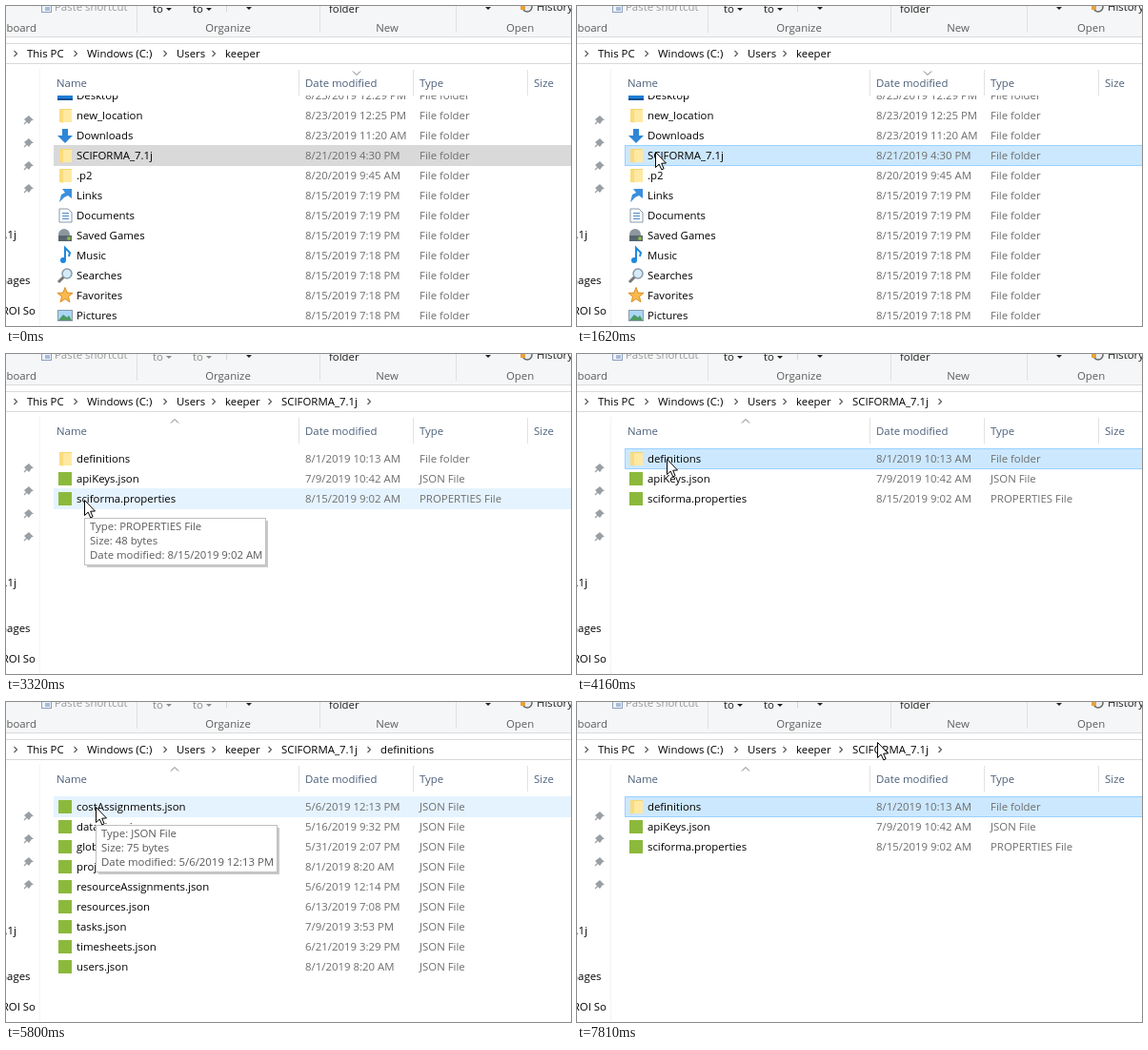
An HTML page with a canvas for the animation above (8000 ms loop, 593 by 336 pixels).

```html
<!DOCTYPE html>
<html lang="en">
<head>
<meta charset="utf-8">
<title>File browser</title>
<style>
  html, body { margin: 0; width: 593px; height: 336px; overflow: hidden; background: #fff; }
  canvas { display: block; }
</style>
</head>
<body>
<canvas id="stage" width="593" height="336"></canvas>
<script>
const ctx = document.getElementById('stage').getContext('2d');
const LOOP = 8000, ROW = 21;
const FONT = '11.4px "Open Sans", "Noto Sans", sans-serif';

const parse = rows => rows.map(r => r.split('|'));
const folders = {
  home: { top: 83, sort: 368, rows: parse([
    'desktop|Desktop|8/23/2019 12:29 PM', 'folder|new_location|8/23/2019 12:25 PM',
    'down|Downloads|8/23/2019 11:20 AM', 'folder|SCIFORMA_7.1j|8/21/2019 4:30 PM',
    'folder|.p2|8/20/2019 9:45 AM', 'link|Links|8/15/2019 7:19 PM',
    'page|Documents|8/15/2019 7:19 PM', 'game|Saved Games|8/15/2019 7:19 PM',
    'music|Music|8/15/2019 7:18 PM', 'search|Searches|8/15/2019 7:18 PM',
    'star|Favorites|8/15/2019 7:18 PM', 'picture|Pictures|8/15/2019 7:18 PM']) },
  project: { top: 99, sort: 177, rows: parse([
    'folder|definitions|8/1/2019 10:13 AM', 'file|apiKeys.json|7/9/2019 10:42 AM|JSON File',
    'file|sciforma.properties|8/15/2019 9:02 AM|PROPERTIES File']) },
  definitions: { top: 99, sort: 177, rows: parse([
    'costAssignments|5/6/2019 12:13 PM', 'dataviews|5/16/2019 9:32 PM', 'globals|5/31/2019 2:07 PM',
    'projects|8/1/2019 8:20 AM', 'resourceAssignments|5/6/2019 12:14 PM', 'resources|6/13/2019 7:08 PM',
    'tasks|7/9/2019 3:53 PM', 'timesheets|6/21/2019 3:29 PM', 'users|8/1/2019 8:20 AM'
  ]).map(([name, date]) => ['file', name + '.json', date, 'JSON File']) }
};

// time, x, y of the pointer tip
const pointerKeys = [
  [300, 108, 133], [379, 108, 133], [380, 100, 121], [680, 100, 121], [1220, 83, 153],
  [3400, 83, 153], [3780, 95, 110], [5800, 95, 110], [6180, 290, 47], [6260, 304, 44], [6420, 316, 42]
];

function pointerAt(t) {
  const next = pointerKeys.findIndex(k => k[0] > t);
  if (next < 0) return pointerKeys.at(-1).slice(1);
  if (next === 0) return null;
  const [t0, x0, y0] = pointerKeys[next - 1], [t1, x1, y1] = pointerKeys[next];
  const p = (t - t0) / (t1 - t0), e = p * p * (3 - 2 * p);
  return [x0 + (x1 - x0) * e, y0 + (y1 - y0) * e];
}

const within = (t, a, b) => t >= a && t < b;

function rect(x, y, w, h, fill, border) {
  ctx.fillStyle = fill;
  ctx.fillRect(x, y, w, h);
  if (border) {
    ctx.strokeStyle = border;
    ctx.lineWidth = 1;
    ctx.strokeRect(x + .5, y + .5, w - 1, h - 1);
  }
}

function text(s, x, y, color = '#000', align = 'left') {
  ctx.fillStyle = color;
  ctx.textAlign = align;
  ctx.fillText(s, x, y);
}

function poly(points, fill, stroke, width = 1) {
  ctx.beginPath();
  for (let i = 0; i < points.length; i += 2) ctx.lineTo(points[i], points[i + 1]);
  if (fill) { ctx.closePath(); ctx.fillStyle = fill; ctx.fill(); }
  if (stroke) { ctx.strokeStyle = stroke; ctx.lineWidth = width; ctx.stroke(); }
}

function circle(x, y, r, fill, stroke, width = 1) {
  ctx.beginPath();
  ctx.arc(x, y, r, 0, 7);
  if (fill) { ctx.fillStyle = fill; ctx.fill(); }
  if (stroke) { ctx.strokeStyle = stroke; ctx.lineWidth = width; ctx.stroke(); }
}

const chevron = x => poly([x - 1.5, 47, x + 1.5, 50, x - 1.5, 53], null, '#555', 1.1);
const dropArrow = (x, y, color) => poly([x - 3, y - 1, x + 3, y - 1, x, y + 2], color);

// Each icon is drawn around the centre of its 16 pixel cell.
const icons = {
  folder() {
    rect(-6, -7, 13, 14, '#f6d673');
    rect(-2, -6, 9, 13, '#ffe9a2');
    poly([-6, -7, -2, -5, -2, 8, -6, 6], '#fbdc7c');
  },
  file() { rect(-7, -7, 14, 14, '#8cb93c'); },
  desktop() { rect(-8, -6, 16, 11, '#1d7fd6'); rect(-8, 3, 16, 2, '#0b4f94'); },
  down() { poly([-3, -7, 3, -7, 3, 0, 8, 0, 0, 8, -8, 0, -3, 0], '#2f86d6'); },
  link() { poly([-6, 7, -4, -1, 0, -3, -3, -7, 7, -7, 7, 3, 3, 0, -1, 2], '#3a8fdc'); },
  page() {
    poly([-6, -7, 3, -7, 7, -3, 7, 7, -6, 7], '#fff', '#8a9aa8');
    for (let y = -3; y < 6; y += 3) rect(-3, y, 7, 1, '#4c8cc4');
  },
  game() { circle(-1, -1, 6, '#8b969e'); rect(-7, 0, 14, 6, '#59656e'); circle(4, 3, 2, '#86b84c'); },
  music() { circle(-2, 5, 3, '#1e88e0'); poly([0, 5, 0, -8, 5, -3, 4, 1], null, '#1e88e0', 2); },
  search() { poly([-7, 7, -1, 1], null, '#777', 3); circle(2, -2, 5, '#d5ebfa', '#8a9aa8', 1.5); },
  star() {
    const p = [];
    for (let i = 0; i < 10; i++) {
      const r = i % 2 ? 3.6 : 8.5, a = i * Math.PI / 5;
      p.push(r * Math.sin(a), -r * Math.cos(a));
    }
    poly(p, '#f9b94b', '#dc8f27');
  },
  picture() {
    rect(-8, -6, 16, 12, '#a9d7f5', '#8a9aa8');
    poly([-7, 5, -2, -1, 2, 2, 4, 0, 7, 5], '#4d9a63');
  }
};

function icon(kind, x, y) {
  ctx.save();
  ctx.translate(x, y);
  icons[kind]();
  ctx.restore();
}

function drawRibbon(enabled) {
  rect(0, 0, 593, 32, '#f5f6f7');
  rect(0, 32, 593, 1, '#dadbdc');
  for (const x of [137, 329, 472]) rect(x, 0, 1, 28, '#dfe0e1');
  text('Clipboard', 32, 27, '#5c5c5c', 'right');
  text('Organize', 233, 27, '#5c5c5c', 'center');
  text('New', 400, 27, '#5c5c5c', 'center');
  text('Open', 539.5, 27, '#5c5c5c', 'center');
  rect(37, -4, 11, 11, '#eef3fa', '#8da0bd');
  rect(41, 1, 5, 4, '#a9bbd6');
  text('Paste shortcut', 51, 5, '#9a9a9a');
  const tone = enabled ? '#1e1e1e' : '#8d8d8d';
  for (const x of [154, 196]) {
    text('to', x, 7, tone);
    dropArrow(x + 17, 3, tone);
  }
  rect(231, 0, 1, 6, '#d5d6d7');
  dropArrow(255, 2, '#222');
  text('folder', 339, 7, '#1e1e1e');
  dropArrow(506, 2, '#222');
  circle(547, 1, 5, '#e6eef3', '#666', 1.5);
  rect(540, -2, 5, 6, '#e7a23c');
  text('History', 557, 5, '#1e1e1e');
}

function drawAddress(place, t) {
  rect(-2, 39, 597, 22, '#fff', '#d9d9d9');
  if (within(t, 6260, 7580)) {
    const pressed = within(t, 7030, 7260);
    const fill = pressed ? '#cce8ff' : '#e5f3ff', border = pressed ? '#99d1ff' : '#cce8ff';
    rect(285, 40, 90, 20, fill, border);
    if (t < 7260) rect(374, 40, 15, 20, fill, border);
  }
  const crumbs = [['This PC', 22], ['Windows (C:)', 85], ['Users', 179], ['keeper', 230]];
  if (place !== 'home') crumbs.push(['SCIFORMA_7.1j', 289]);
  if (place === 'definitions') crumbs.push(['definitions', 393]);
  for (const [name, x] of crumbs) {
    text(name, x, 54);
    chevron(x - 12);
  }
  if (place === 'project' && (within(t, 2310, 7260) || t >= 7810)) chevron(381);
}

function drawSidebar() {
  for (let y = 119; y < 200; y += 24) {
    poly([24, y - 4, 29, y + 1, 27, y + 1, 24, y + 5, 19, y], '#9a9fa3');
    poly([19, y + 5, 22, y + 2], null, '#9a9fa3', 1.2);
  }
  text('7.1j', 11, 244, '#000', 'right');
  text('Images', 25.5, 292, '#000', 'right');
  text('ROI So', 31, 324, '#000', 'right');
  rect(35, 66, 1, 270, '#f3f3f3');
}

function drawHeader(sortX, descending, hovered) {
  rect(36, 62, 557, 32, '#fff');
  if (hovered) rect(36, 67, 271, 27, '#d9ebf9');
  [['Name', 53], ['Date modified', 314], ['Type', 434], ['Size', 554]]
    .forEach(([label, x]) => text(label, x, 85, '#4c607a'));
  for (const x of [307, 427, 547]) rect(x, 67, 1, 27, '#e2e2e2');
  const [edge, tip] = descending ? [68.5, 72.5] : [72.5, 68.5];
  poly([sortX - 4, edge, sortX, tip, sortX + 4, edge], null, '#777');
}

function drawRows(place, t, pointer) {
  const { top, rows } = folders[place];
  const hover = pointer && pointer[1] > 94 ? Math.floor((pointer[1] - top) / ROW) : -1;
  const chosen = place === 'home' ? 3
    : place === 'project' && (within(t, 4010, 4250) || t >= 7430) ? 0 : -1;
  rows.forEach(([kind, name, date, type = 'File folder'], i) => {
    const y = top + i * ROW;
    if (i === chosen) {
      if (place === 'home' && hover !== i) rect(50, y, 543, ROW + 1, '#d9d9d9');
      else rect(50, y, 545, ROW + 1, '#cce8ff', '#99d1ff');
    } else if (i === hover) rect(50, y, 543, ROW + 1, '#e5f3ff');
    icon(kind, 62, y + 11);
    text(name, 74, y + 15);
    text(date, 314, y + 15, '#6d6d6d');
    text(type, 434, y + 15, '#6d6d6d');
  });
}

function drawTip(t, start, leave, x, y, lines) {
  if (!within(t, start, leave + 160)) return;
  const fadeIn = .17 + .83 * (t - start) / 240, fadeOut = 1 - (t - leave) / 160;
  ctx.globalAlpha = Math.min(1, fadeIn, fadeOut);
  const w = Math.round(ctx.measureText(lines[2]).width) + 10, h = 50;
  rect(x + w, y + 3, 2, h - 1, '#c8c8c8');
  rect(x + 3, y + h, w - 3, 2, '#c8c8c8');
  rect(x, y, w, h, '#fff', '#bebebe');
  lines.forEach((line, i) => text(line, x + 6, y + 13 + i * 15, '#575757'));
  ctx.globalAlpha = 1;
}

function drawPointer([x, y], clicked) {
  if (clicked) circle(x - .5, y, 12, 'rgba(255,255,0,.47)');
  ctx.save();
  ctx.translate(x - .5, y + .5);
  poly([0, 0, 0, 16, 3.7, 12.6, 6.3, 18.4, 8.6, 17.3, 6.2, 11.7, 11, 11.5, 0, 0], '#fff', '#000');
  ctx.restore();
}

function draw(t) {
  const place = t < 1920 ? 'home' : within(t, 4250, 7260) ? 'definitions' : 'project';
  const pointer = pointerAt(t);
  ctx.font = FONT;
  rect(0, 0, 593, 336, '#fff');
  drawRows(place, t, pointer);
  drawHeader(folders[place].sort, place === 'home', pointer && within(pointer[1], 66, 94));
  drawRibbon(t < 2000 || within(t, 4160, 4400) || t >= 7580);
  drawAddress(place, t);
  drawSidebar();
  drawTip(t, 3090, 3400, 82, 172,
    ['Type: PROPERTIES File', 'Size: 48 bytes', 'Date modified: 8/15/2019 9:02 AM']);
  drawTip(t, 5410, 5800, 94, 129,
    ['Type: JSON File', 'Size: 75 bytes', 'Date modified: 5/6/2019 12:13 PM']);
  const clicked = within(t, 1540, 1620) || within(t, 4010, 4160) || within(t, 7030, 7260);
  if (pointer) drawPointer(pointer, clicked);
}

function tick() {
  draw(performance.now() % LOOP);
  requestAnimationFrame(tick);
}
tick();
</script>
</body>
</html>
```
